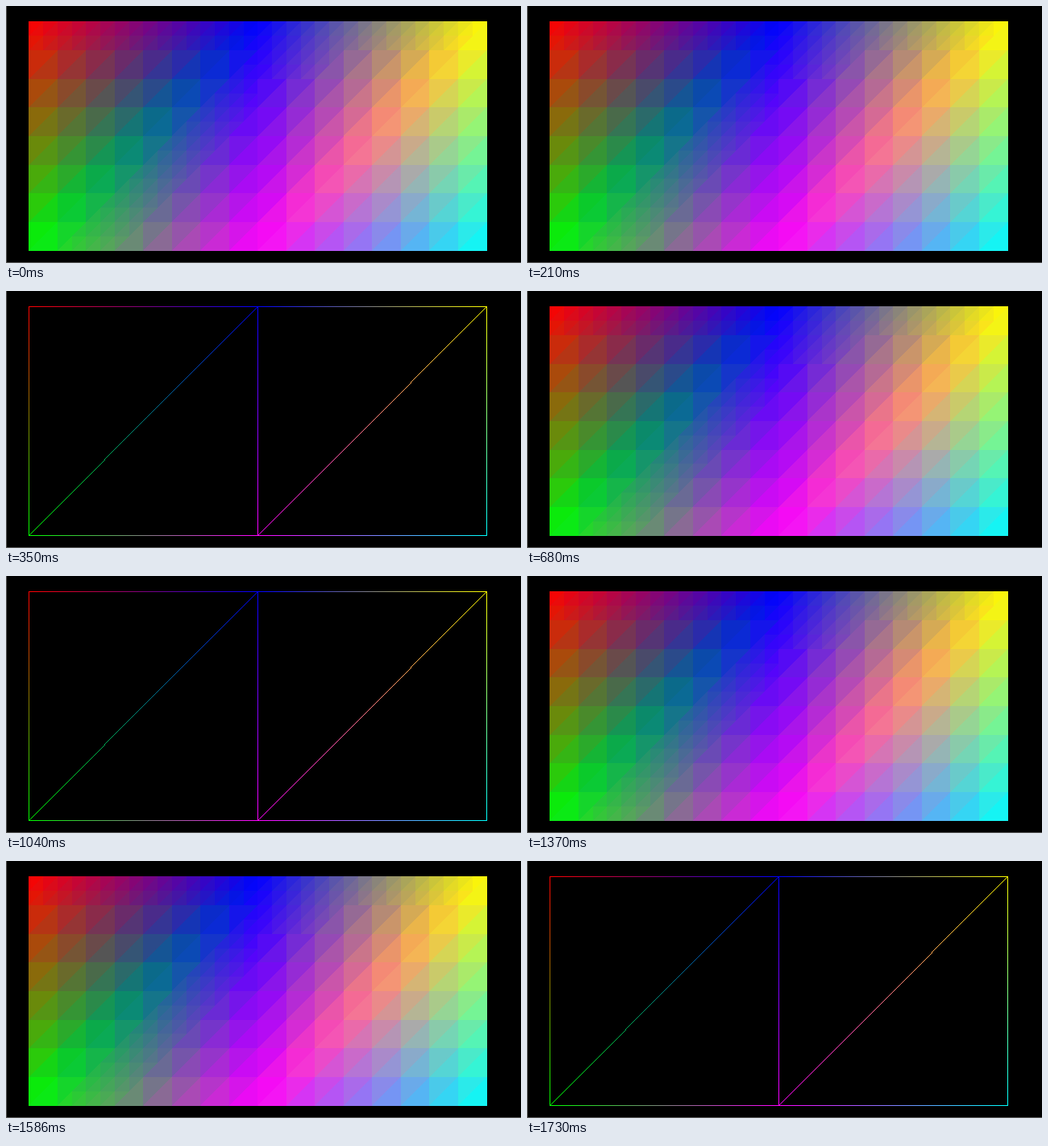
Animation, 639 px wide and 320 px high, one loop 1960 ms. Source, as an HTML page with a canvas:

```html
<!DOCTYPE html>
<html lang="en">
<head>
<meta charset="utf-8">
<title>Gouraud squares</title>
<style>
  html, body { margin: 0; width: 100%; height: 100%; overflow: hidden; background: #000; }
  canvas { display: block; }
</style>
</head>
<body>
<canvas id="stage" width="639" height="320"></canvas>
<script>
const WIDTH = 639, HEIGHT = 320, LEFT = 28, TOP = 19, SIDE_X = 284, SIDE_Y = 285, CELLS = 8;
const LOOP = 1960, SWITCHES = [350, 680, 1040, 1370, 1730];
const ctx = document.getElementById('stage').getContext('2d');

const red = [255, 0, 0], green = [0, 255, 0], blue = [0, 0, 255];
const magenta = [255, 0, 255], yellow = [255, 255, 0], cyan = [0, 255, 255];
const squares = [
  { tl: red, tr: blue, bl: green, br: magenta },
  { tl: blue, tr: yellow, bl: magenta, br: cyan }
];

const mix = (a, b, t) => a.map((v, i) => v + (b[i] - v) * t);
const css = c => `rgb(${c.map(Math.round).join()})`;

// Linear colour over the two triangles that share the rising diagonal.
function gouraud({ tl, tr, bl, br }, u, v, upper) {
  return upper
    ? tl.map((c, i) => c + (tr[i] - c) * u + (bl[i] - c) * v)
    : br.map((c, i) => c + (bl[i] - c) * (1 - u) + (tr[i] - c) * (1 - v));
}

// Some parts of the mesh are split one level deeper.
function isFine(square, upper, x, y) {
  const band = Math.floor(x + y) - CELLS;
  if (upper) return y < 1 || (square === 1 && y < 2 && x + y < 4);
  return square === 0 && (band === 1 || band === 2 || y < 1);
}

function facetColor(square, u, v) {
  const upper = u + v < 1;
  const cells = isFine(square, upper, u * CELLS, v * CELLS) ? CELLS * 2 : CELLS;
  const col = Math.floor(u * cells), row = Math.floor(v * cells);
  const third = u * cells - col + v * cells - row < 1 ? 1 / 3 : 2 / 3;
  return gouraud(squares[square], (col + third) / cells, (row + third) / cells, upper);
}

function blankLayer() {
  const layer = document.createElement('canvas');
  layer.width = WIDTH;
  layer.height = HEIGHT;
  const g = layer.getContext('2d');
  g.fillStyle = '#000';
  g.fillRect(0, 0, WIDTH, HEIGHT);
  g.fillStyle = '#555';
  g.fillRect(0, 0, 1, HEIGHT);
  g.fillRect(0, HEIGHT - 1, WIDTH, 1);
  return { layer, g };
}

function makeFilled() {
  const { layer, g } = blankLayer();
  for (let y = 0; y <= SIDE_Y; y++) {
    for (let x = 0; x <= SIDE_X * 2; x++) {
      const square = x < SIDE_X ? 0 : 1;
      const u = Math.min(x / SIDE_X - square, 0.9999);
      g.fillStyle = css(facetColor(square, u, Math.min(y / SIDE_Y, 0.9999)));
      g.fillRect(LEFT + x, TOP + y, 1, 1);
    }
  }
  return layer;
}

function makeWire() {
  const { layer, g } = blankLayer();
  // Ends are in square sides; bias sets where a near-45° line takes its odd step.
  function line(x0, y0, from, x1, y1, to, bias = 0.5) {
    for (let i = 0; i <= SIDE_Y; i++) {
      const t = i / SIDE_Y;
      g.fillStyle = css(mix(from, to, t));
      g.fillRect(LEFT + Math.floor((x0 + (x1 - x0) * t) * SIDE_X + bias),
                 TOP + Math.round((y0 + (y1 - y0) * t) * SIDE_Y), 1, 1);
    }
  }
  squares.forEach(({ tl, tr, bl, br }, s) => {
    line(s, 0, tl, s + 1, 0, tr);
    line(s, 1, bl, s + 1, 0, tr, (s + 1) / 3);
    line(s, 1, bl, s + 1, 1, br);
    line(s, 0, tl, s, 1, bl);
    line(s + 1, 0, tr, s + 1, 1, br);
  });
  return layer;
}

const layers = [makeFilled(), makeWire()];

function draw() {
  const t = performance.now() % LOOP;
  const switched = SWITCHES.filter(s => t >= s).length;
  ctx.drawImage(layers[switched % 2], 0, 0);
  requestAnimationFrame(draw);
}
draw();
</script>
</body>
</html>
```
